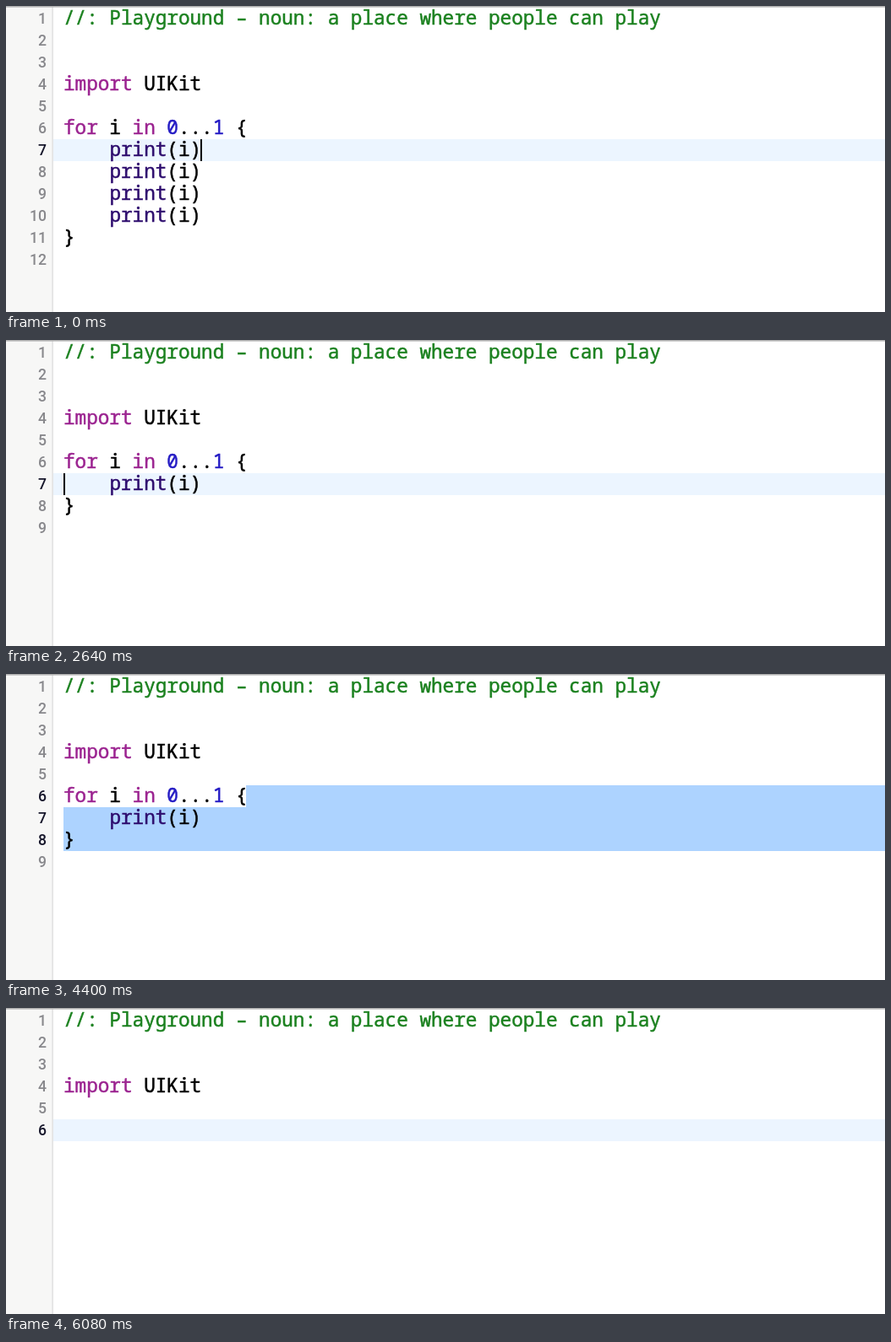
An HTML page for the animation above (6.16 s loop, 1040 px wide and 363 px high).

```html
<!DOCTYPE html>
<html lang="en">
<head>
<meta charset="utf-8">
<title>Code editor</title>
<style>
  html, body { margin: 0; width: 100%; height: 100%; overflow: hidden; background: #fff; }
  svg { display: block; }
  text { white-space: pre; }
  .code { font: 500 22.67px "Noto Sans Mono", "DejaVu Sans Mono", monospace; stroke-width: .5px; }
  .code, .plain { fill: #000; stroke: #000; }
  .comment { fill: #1b811f; stroke: #1b811f; }
  .keyword { fill: #9b2390; stroke: #9b2390; }
  .number { fill: #241bc4; stroke: #241bc4; }
  .call { fill: #2e0d6e; stroke: #2e0d6e; }
  .gutter { font: 500 17.6px Roboto, Inter, sans-serif; text-anchor: end; fill: #88888c; }
  .active { fill: #17172b; }
</style>
</head>
<body>
<svg id="stage" width="1040" height="363" viewBox="0 0 1040 363">
  <rect width="1040" height="363" fill="#fff"/>
  <rect width="55" height="363" fill="#f7f7f6"/>
  <rect x="54.5" width="1.3" height="363" fill="#dcdcdc"/>
  <g id="shades"></g>
  <rect width="1040" height="1.6" fill="#b2b2b2"/>
  <g id="lines"></g>
  <rect id="caret" width="2" height="26" fill="#000"/>
</svg>
<script>
const LOOP = 6160, STEP = 80, WIDTH = 1040;
const LEFT = 68, CHAR = 13.56, ROW = 26;
const BLINK = 500;

const shades = document.getElementById("shades");
const lines = document.getElementById("lines");
const caret = document.getElementById("caret");

const rowTop = row => 2 + ROW * (row - 1);
const colX = col => LEFT + CHAR * col;
const span = (kind, text) => `<tspan class="${kind}">${text}</tspan>`;

const head = [
  span("comment", "//: Playground – noun: a place where people can play"),
  "", "",
  span("keyword", "import") + " UIKit",
  ""
];
const loopLine = span("keyword", "for") + " i " + span("keyword", "in") + " " +
  span("number", "0") + "..." + span("number", "1") + " {";
const callLine = "    " + span("call", "print") + "(i)";
const plainLine = "    print(i)";

// Each edit inherits what it does not change; "from" starts a selection ending at row 8.
const edits = [
  { at: 0, calls: 4, first: callLine, row: 7, col: 12, from: null },
  { at: 480, col: 0 },
  { at: 800, first: "" },
  { at: 1120, calls: 3, first: plainLine },
  { at: 1360, first: callLine, keepBlink: true },
  { at: 1520, first: "", keepBlink: false },
  { at: 1760, calls: 2, first: plainLine },
  { at: 1920, first: callLine, keepBlink: true },
  { at: 2080, first: "", keepBlink: false },
  { at: 2400, calls: 1, first: plainLine },
  { at: 2560, first: callLine, keepBlink: true },
  { at: 3360, row: 9, hideCaret: true },
  { at: 3600, from: [8, 1] },
  { at: 3760, from: [7, 12] },
  { at: 4080, from: [6, 16] },
  { at: 5360, from: [6, 0] },
  { at: 5520, calls: 0, row: 6, from: null, hideCaret: false, keepBlink: false }
];

function stateAt(time) {
  const state = { moved: 0 };
  for (const edit of edits) {
    if (edit.at > time) break;
    Object.assign(state, edit);
    if (!state.keepBlink) state.moved = edit.at;
  }
  return state;
}

function documentLines({ calls, first }) {
  if (!calls) return [...head, ""];
  return [...head, loopLine, first, ...Array(calls - 1).fill(callLine), "}", ""];
}

const shade = (x, row, color) =>
  `<rect x="${x}" y="${rowTop(row)}" width="${WIDTH - x}" height="${ROW}" fill="${color}"/>`;

function drawShades({ from, row }) {
  if (!from) return shade(56, row, "#ecf5ff");
  let result = "";
  for (let r = from[0]; r <= 8; r++) {
    const x = r === from[0] ? Math.floor(colX(from[1])) : LEFT;
    result += shade(x, r, "#add3ff");
  }
  return result;
}

function drawLine(text, row, { from, row: current }) {
  const active = from ? row >= from[0] && row <= 8 : row === current;
  const y = rowTop(row);
  return `<text class="gutter${active ? " active" : ""}" x="48" y="${y + 19}">${row}</text>` +
    (text && `<text class="code" x="${LEFT}" y="${y + 20}">${text}</text>`);
}

function render(time) {
  const state = stateAt(time);
  shades.innerHTML = drawShades(state);
  lines.innerHTML = documentLines(state)
    .map((text, i) => drawLine(text, i + 1, state)).join("");

  const lit = Math.floor((time - state.moved) / BLINK) % 2 === 0;
  caret.setAttribute("x", Math.floor(colX(state.col)));
  caret.setAttribute("y", rowTop(state.row));
  caret.setAttribute("visibility",
    lit && !state.from && !state.hideCaret ? "visible" : "hidden");
}

const start = performance.now();
let shown = -1;
function tick(now) {
  const elapsed = Math.max(0, now - start) % LOOP;
  const time = Math.floor(elapsed / STEP) * STEP;
  if (time !== shown) render(shown = time);
  requestAnimationFrame(tick);
}
tick(start);
</script>
</body>
</html>
```
